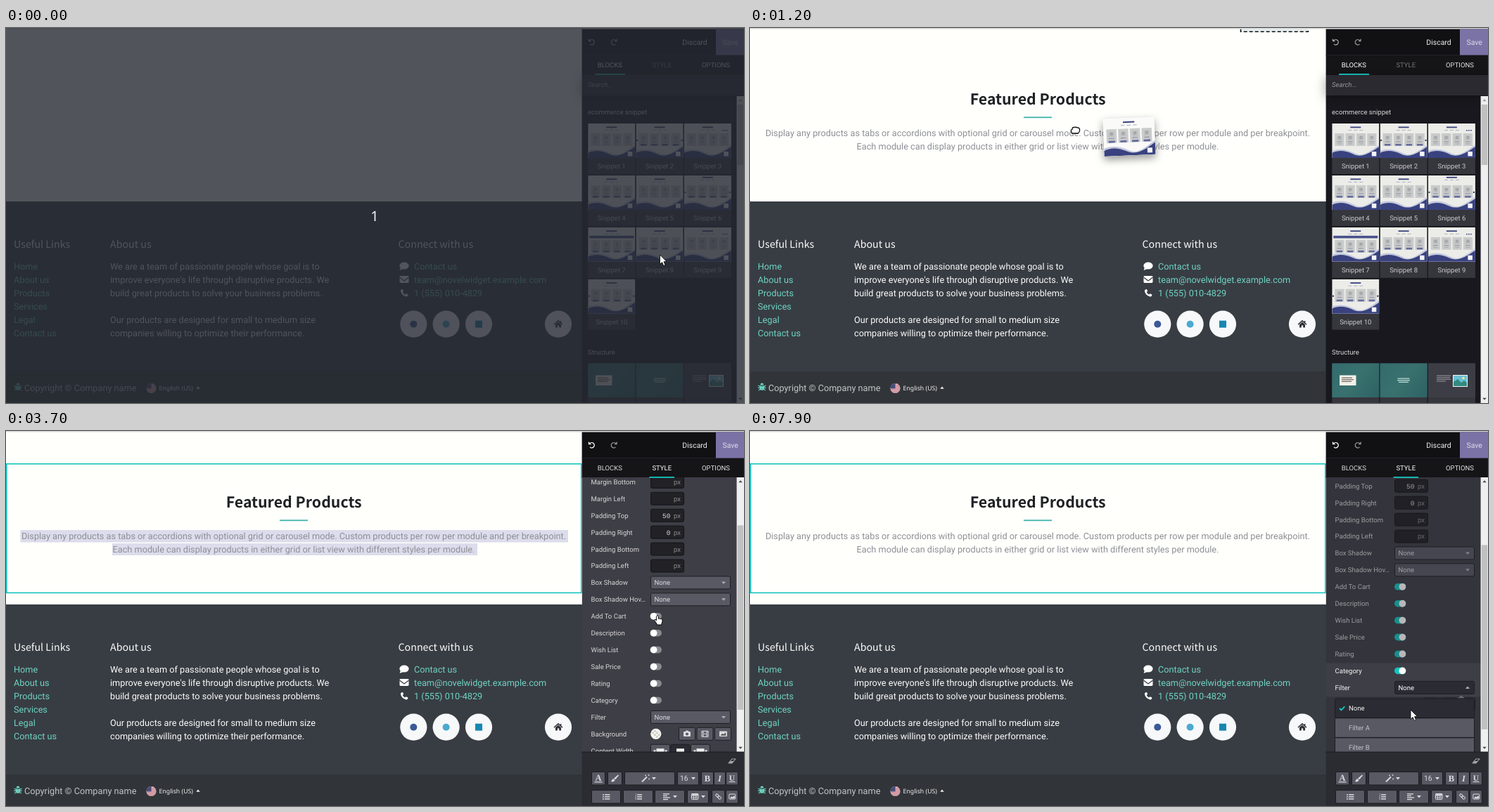
Recreate the animation shown at these times as an HTML page with a canvas. Size 1049 by 534 pixels, loop 8 s.

```html
<!DOCTYPE html>
<html lang="en">
<head>
<meta charset="utf-8">
<title>Page builder</title>
<style>
html, body { margin: 0; width: 100%; height: 100%; overflow: hidden; background: #fffffc; }
canvas { display: block; width: 1049px; height: 534px; }
</style>
</head>
<body>
<canvas id="stage" width="1049" height="534"></canvas>
<script>
const c = document.getElementById('stage').getContext('2d');
const LOOP = 8000, STEP = 100;
const UI = 'Roboto, sans-serif';
const HEAD = '"Noto Sans CJK JP", "Noto Sans CJK SC", "Noto Sans CJK", "Noto Sans", sans-serif';
const MONO = '"Liberation Mono", monospace';
const SMALL = 9.54, BODY = 12.72, SIDE = 818.6;
const TEAL = '#15c4be', LINK = '#6fd3c2', BTN = '#595964', DARK = '#1d1d22', ICON = '#dcdcdf';

// ---------- helpers ----------
function text(s, x, y, size, color, { font = UI, align = 'left', style = '' } = {}) {
  c.font = `${style} ${size}px ${font}`;
  c.textAlign = align;
  c.fillStyle = color;
  c.fillText(s, x, y + size * 0.36);
}
function box(x, y, w, h, color) {
  c.fillStyle = color;
  c.fillRect(x, y, w, h);
}
function shadowBox(x, y, w, h, color, shade, blur, drop = 0) {
  c.save();
  c.shadowColor = shade;
  c.shadowBlur = blur;
  c.shadowOffsetY = drop;
  box(x, y, w, h, color);
  c.restore();
}
function round(x, y, w, h, r, fill, line) {
  c.beginPath();
  c.roundRect(x, y, w, h, r);
  if (fill) { c.fillStyle = fill; c.fill(); }
  if (line) { c.strokeStyle = line; c.lineWidth = 1; c.stroke(); }
}
function dot(x, y, r, color) {
  c.beginPath();
  c.arc(x, y, r, 0, 7);
  c.fillStyle = color;
  c.fill();
}
function shape(d, x, y, fill, line, width = 1, scale = 1) {
  const p = new Path2D(d);
  c.save();
  c.translate(x, y);
  c.scale(scale, scale);
  c.lineWidth = width;
  c.lineJoin = 'round';
  if (fill) { c.fillStyle = fill; c.fill(p); }
  if (line) { c.strokeStyle = line; c.stroke(p); }
  c.restore();
}
const caretDown = (x, y, color, s = 1) => shape('M-3 -1.5H3L0 2Z', x, y, color, null, 1, s);
const caretUp = (x, y, color, s = 1) => shape('M-3 1.5H3L0 -2Z', x, y, color, null, 1, s);
function clip(x, y, w, h, draw) {
  c.save();
  c.beginPath();
  c.rect(x, y, w, h);
  c.clip();
  draw();
  c.restore();
}
function along(keys, t) {
  let i = 1;
  while (i < keys.length - 1 && keys[i][0] < t) i++;
  const a = keys[i - 1], b = keys[i];
  const k = Math.min(1, Math.max(0, (t - a[0]) / (b[0] - a[0])));
  return a.slice(1).map((v, j) => v + (b[j + 1] - v) * k);
}

// ---------- small icons ----------
function turnArrow(x, y, dir, color) {
  c.save();
  c.translate(x, y);
  c.scale(dir, 1);
  c.beginPath();
  c.arc(0, 0.3, 3.7, -2.4, 2.3);
  c.strokeStyle = color;
  c.lineWidth = 1.4;
  c.stroke();
  shape('M-4.6 -5V-0.8H-0.4Z', 0, 0, color);
  c.restore();
}
function trash(x, y, color) {
  shape('M-4 -3.4H4M-1.4 -3.4V-4.6H1.4V-3.4M-3 -3L-2.6 4.4H2.6L3 -3M-1 -1V3M1 -1V3', x, y, null, color, 1.1);
}
function chain(x, y, color) {
  c.save();
  c.translate(x, y);
  c.rotate(0.75);
  round(-4.6, -1.6, 5, 3.2, 1.6, null, color);
  round(-0.4, -1.6, 5, 3.2, 1.6, null, color);
  c.restore();
}
function picture(x, y, color) {
  round(x - 4.5, y - 3.5, 9, 7, 1, null, color);
  shape('M-3.5 2.6L-1 -0.4L0.6 1L2.4 -1.4L3.6 0V2.6Z', x, y, color);
}
function lines(x, y, widths, color, align = 0) {
  widths.forEach((w, i) => box(x - w * align, y + i * 2.6, w, 1.3, color));
}

// ---------- page ----------
const PHONE = 'M-4 -5L-2 -5.4L-0.8 -2.6L-2.2 -1.4C-1.4 0.3 -0.2 1.5 1.4 2.2L2.6 0.8L5.4 2L5 4C4.4 5 3.4 5.3 2.4 5C-1.6 4 -4.2 1.2 -5 -2.4C-5.2 -3.6 -4.8 -4.6 -4 -5Z';

function footer() {
  box(0, 247, 819, 242, '#383d43');
  box(0, 489, 819, 45, '#313539');
  const head = (s, x) => text(s, x, 308, 14.25, '#fbfbfb', { font: HEAD });
  head('Useful Links', 11);
  head('About us', 148);
  head('Connect with us', 557.5);
  const rows = (list, x, color) => list.forEach((s, i) => text(s, x, 339 + i * 19.1, BODY, color));
  rows(['Home', 'About us', 'Products', 'Services', 'Legal', 'Contact us'], 11, LINK);
  rows(['We are a team of passionate people whose goal is to',
    'improve everyone\'s life through disruptive products. We',
    'build great products to solve your business problems.', '',
    'Our products are designed for small to medium size',
    'companies willing to optimize their performance.'], 148, '#fbfbfb');
  rows(['Contact us', 'team@novelwidget.example.com', '1 (555) 010-4829'], 580, LINK);

  c.beginPath();
  c.ellipse(566, 338.6, 6.6, 5, 0, 0, 7);
  c.fillStyle = '#fff';
  c.fill();
  shape('M-5 2L-6.4 6.4L0 4Z', 566, 338.6, '#fff');
  round(559.5, 353, 13, 10, 1.4, '#fff');
  shape('M-6.6 -3L0 2L6.6 -3', 566, 358, null, '#383d43', 1.2);
  shape(PHONE, 566, 377.4, '#fff');

  [579.3, 625.6, 672, 785].forEach(x => dot(x, 421.7, 19.1, '#f6f8f9'));
  dot(579.3, 421.7, 5, '#3b5998');
  dot(625.6, 421.7, 5, '#4ba9cf');
  box(667, 416.7, 10, 10, '#1787b0');
  shape('M-6 0.6L0 -4.8L6 0.6M3.6 -4.6V-2', 785, 421.7, null, '#2d3034', 1.5);
  shape('M-4 0.6L0 -3L4 0.6V4.8H1.2V1.8H-1.2V4.8H-4Z', 785, 421.7, '#2d3034');

  shape('M-5.4 -2L-2 0M5.4 -2L2 0M-5.6 1.4H5.6M-4.8 5L-2 3M4.8 5L2 3M0 -1V5', 17, 511, null, LINK, 1.3);
  shape('M-2.4 -2.4C-2.4 -6.4 2.4 -6.4 2.4 -2.4ZM-3.2 -1.4H-0.5V5C-2.6 4.8 -3.2 3 -3.2 1ZM3.2 -1.4H0.5V5C2.6 4.8 3.2 3 3.2 1Z', 17, 511, LINK);
  text('Copyright © Company name', 26, 512, BODY, '#c3c5c7');

  c.save();
  c.beginPath();
  c.arc(206.5, 513, 7, 0, 7);
  c.clip();
  box(199, 506, 15, 14, '#f0eef0');
  for (let i = 0; i < 7; i++) box(199, 506 + i * 2.1, 15, 1.05, '#b5495a');
  box(199, 506, 7.5, 7.4, '#474a7a');
  c.restore();
  text('English (US)', 217.5, 513, 8.75, '#f1f1f1', { font: '"Noto Sans", "Open Sans", sans-serif' });
  caretUp(273, 512.3, '#f1f1f1', 0.9);
}

function feature(selected) {
  if (selected) {
    box(20.5, 141, 778.5, 17.5, '#dcdcec');
    box(151, 160, 519, 17, '#dcdcec');
  }
  text('Featured Products', 409.2, 101.5, 21.3, '#1f2124', { font: HEAD, align: 'center', style: 'bold' });
  box(389, 126.4, 40, 1.8, '#3fb3ab');
  const p = { align: 'center' };
  text('Display any products as tabs or accordions with optional grid or carousel mode. Custom products per row per module and per breakpoint.', 409, 149.3, BODY, '#8d8f95', p);
  text('Each module can display products in either grid or list view with different styles per module.', 409, 168.5, BODY, '#8d8f95', p);
}

function handles() {
  round(385.5, 26.5, 23, 18, 2, '#4a4a54', '#3a3a42');
  for (let i = 0; i < 6; i++) box(392 + (i % 3) * 4, 33 + (i > 2 ? 4 : 0), 2.4, 2.4, '#f2f2f2');
  round(414.5, 26.5, 18, 18, 2, '#84454e', '#6b3a42');
  trash(423.5, 35.7, '#f1e6e8');
  const arrow = (y, color) => {
    box(401, y - 8, 16, 16, color);
    shape('M0 -5V4M-4 0.4L0 4.4L4 0.4', 409, y, null, '#fff', 1.8);
  };
  arrow(71.7, '#98989b');
  arrow(205.3, '#126e68');
}

// ---------- snippet thumbnails ----------
function thumb(n, paper = '#ecede8') {
  const NAVY = '#39427f', barRow = n === 7, top = barRow ? 18 : 14;
  clip(0, 0, 67, 49, () => {
    box(0, 0, 67, 49, paper);
    box(26, n === 6 ? 2 : 4.5, 15, 1.8, NAVY);
    for (let i = 0; i < 3; i++) box(23 + i * 8, n === 6 ? 6 : 9, 5, 0.9, '#a9adb8');
    if (barRow) box(2, 12, 63, 3.6, '#47518a');
    if (n === 3 || n === 9) [54, 57, 60].forEach(x => box(x, 9, 2, 1.6, '#565f90'));
    for (let i = 0; i < 4; i++) {
      const x = 4 + i * 15.3;
      box(x, top, 13.2, 18, '#cacbcb');
      box(x + 3, top + 3, 7, 7, '#bfc0c1');
      dot(x + 6.6, top + 6, 2.2, '#a5a7aa');
      box(x + 3, top + 11.5, 7, 1, '#8b8f9e');
      if (n % 2 === 0 || barRow) box(x + 2.4, top + 15, 8.4, 2.6, '#646c9c');
      else box(x + 3.6, top + 14.4, 6, 1, '#a3a6b0');
    }
    if (n === 2 || n === 6 || n === 10) [1.6, 65].forEach(x => dot(x, top + 10, 1.2, '#3c4265'));
    shape('M0 39C12 34 24 38 34 43S56 38 67 30V49H0Z', 0, 0, '#c3c7dd');
    shape('M0 42C10 37 20 39 31 44S54 42 67 33V49H0Z', 0, 0, NAVY);
    box(56.5, 40, 6.5, 6.5, '#f4f4f8');
  });
}

function scrollbar(y0, y1, a, b) {
  box(1038.6, y0, 10.4, y1 - y0, '#efefef');
  box(1039.8, a, 8.4, b - a, '#c0c0c0');
  caretUp(1044, y0 + 6, a - y0 > 12 ? '#45454a' : '#9a9a9c', 0.9);
  caretDown(1044, y1 - 6, '#45454a', 0.9);
}

function blocks() {
  box(SIDE, 96, 1049 - SIDE, 438, '#18181e');
  shadowBox(SIDE, 67, 1049 - SIDE, 29, '#2a2a30', 'rgba(0,0,0,.35)', 16, 3);
  text('Search...', 827, 81, SMALL, '#96969b', { style: 'italic' });
  text('ecommerce snippet', 827, 120, SMALL, '#d8d8da');
  for (let i = 0; i < 10; i++) {
    const x = 827.3 + (i % 3) * 68.3, y = 136 + Math.floor(i / 3) * 73.9;
    box(x, y, 67, 72, '#36363d');
    c.save();
    c.translate(x, y);
    thumb(i + 1);
    c.restore();
    text('Snippet ' + (i + 1), x + 33.5, y + 61, SMALL, '#c9c9cc', { align: 'center' });
  }
  text('Structure', 827, 462, SMALL, '#d8d8da');
  for (let i = 0; i < 3; i++) {
    const x = 827.3 + i * 68.3;
    box(x, 477.5, 67, 57, '#36363d');
    if (i < 2) {
      const g = c.createLinearGradient(x, 477, x + 67, 526);
      g.addColorStop(0, '#336c6c');
      g.addColorStop(0.5, '#38716e');
      g.addColorStop(1, '#2e6264');
      box(x, 477.5, 67, 48.5, g);
    } else box(x, 477.5, 67, 48.5, '#3d3d46');
  }
  box(838, 494.5, 23.5, 14.5, '#f2f0ea');
  lines(841, 497.5, [15, 17, 14], '#7a6f66');
  lines(929, 498.5, [17, 18, 14], '#b9d6d3', 0.5);
  lines(976, 494.5, [20, 19, 20, 13], '#85858e');
  box(999, 494, 21, 17, '#f2f2f2');
  box(1000, 495, 19, 15, '#6cc0d4');
  shape('M0 15V9L6 5L11 10L15 7L19 10V15Z', 1000, 495, '#338a80');
  dot(1014, 498.5, 1.8, '#f5e6a5');
  scrollbar(97, 534, 109, 195);
}

// ---------- style panel ----------
const ROWS = ['Margin Top', 'Margin Right', 'Margin Bottom', 'Margin Left', 'Padding Top', 'Padding Right',
  'Padding Bottom', 'Padding Left', 'Box Shadow', 'Box Shadow Hov…', 'Add To Cart', 'Description', 'Wish List',
  'Sale Price', 'Rating', 'Category', 'Filter', 'Background', 'Content Width'];
const VALUES = { 0: '0', 4: '50', 5: '0' };
const SWITCH_AT = [3900, 4400, 5100, 5600, 6000, 6500];
const OPEN_AT = 6900;

function select(y, open) {
  round(916.5, y - 9, 113, 18, 2, open ? '#2b2b33' : BTN, DARK);
  text('None', 921.5, y, SMALL, open ? '#fff' : '#dadadd');
  (open ? caretUp : caretDown)(1020, y, '#adadb3');
}

function toggle(y, on) {
  round(916, y - 4.8, 16, 9.6, 4.8, on ? TEAL : '#88888e');
  dot(on ? 927.4 : 920.6, y, 4.9, '#fff');
}

function styleRow(i, y, t) {
  const open = t >= OPEN_AT;
  text(ROWS[i], 831.5, y, SMALL, open && (i === 15 || i === 16) ? '#f5f5f5' : '#d6d6d8');
  if (i < 8) {
    round(916.5, y - 9, 47, 18, 2, '#212126', '#131316');
    text(VALUES[i] || '', 944.5, y, SMALL, '#d9d9db', { font: MONO, align: 'right' });
    text('px', 949, y, SMALL, '#8b8b90');
  } else if (i < 10 || i === 16) select(y, i === 16 && open);
  else if (i < 16) toggle(y, t >= SWITCH_AT[i - 10]);
  else if (i === 17) {
    dot(923.8, y, 7.6, '#f4f4f4');
    for (let k = 0; k < 16; k++) {
      const a = k % 4, b = k >> 2;
      if ((a + b) % 2 && !(a % 3 === 0 && b % 3 === 0)) box(918.3 + a * 2.8, y - 5.6 + b * 2.8, 2.8, 2.8, '#d0d0c4');
    }
    [956.5, 982, 1007.5].forEach(x => round(x, y - 9, 23, 18, 2, BTN, DARK));
    round(963, y - 3.2, 10, 7, 1, ICON);
    box(966, y - 4.6, 4, 2, ICON);
    dot(968, y + 0.3, 2, BTN);
    round(989, y - 4, 9, 8, 0, null, ICON);
    shape('M-2.4 -4V4M2.4 -4V4M-2.4 0H2.4M-4 -2H-2.4M-4 2H-2.4M2.4 -2H4M2.4 2H4', 993.5, y, null, ICON, 0.9);
    round(1014, y - 3.8, 11, 7.6, 1, ICON);
    shape('M-4 2.4L-1 -0.6L0.6 0.6L4 -2V2.4Z', 1019.3, y, BTN);
  } else {
    [916.5, 945, 973.5].forEach((x, k) => {
      round(x, y - 9, 27, 18, 2, k === 1 ? '#2b2b33' : BTN, DARK);
      box(x + 8, y - 3, 11, 7, '#f0f0f0');
      if (k !== 1) [4, 20].forEach(dx => box(x + dx, y - 1, 3, 4, ICON));
    });
  }
}

function menu(y) {
  shape('M-6 0L0 -5L6 0Z', 1011, y + 16, '#6b6b74');
  ['None', 'Filter A', 'Filter B'].forEach((s, i) => {
    const top = y + 15.5 + i * 28;
    round(831.5, top, 198, 27.5, i ? 0 : 2, i ? BTN : '#2b2b33', DARK);
    text(s, 851, top + 14, SMALL, i ? '#c3c3c8' : '#f7f7f7');
    if (!i) shape('M-3.6 0L-1 2.6L3.8 -2.6', 841.5, top + 14, null, TEAL, 1.9);
  });
}

function stylePanel(t) {
  const [scroll] = along([[3000, 0], [3400, 84.5], [7200, 84.5], [7600, 126.5]], t);
  const rowY = i => 109 + i * 23.93 - scroll;
  clip(SIDE, 66, 1049 - SIDE, 391, () => {
    box(SIDE, 66, 231, 391, '#3e3e46');
    if (scroll < 30) {
      box(SIDE, 66, 231, 30 - scroll, '#36363d');
      const y = 81 - scroll, g = '#9c9ca1';
      text('Snippet 8', 831.5, y, 10.33, '#f0f0f1');
      chain(970, y, g);
      round(983.2, y - 4, 8, 8, 1, null, g);
      box(985, y - 3.6, 4, 2.4, g);
      box(985, y + 1, 4.4, 3, g);
      round(1001.5, y - 4.4, 6, 6.4, 1, null, g);
      round(1003.8, y - 2, 6, 6.4, 1, '#36363d', g);
      trash(1023.3, y, g);
    }
    ROWS.forEach((_, i) => styleRow(i, rowY(i), t));
    if (t >= OPEN_AT) {
      box(SIDE, 66, 220, rowY(15) - 11 - 66, 'rgba(32,32,38,.32)');
      box(SIDE, rowY(16) + 13, 220, 300, 'rgba(32,32,38,.32)');
      menu(rowY(16));
    }
    scrollbar(66, 457, 78 + scroll * 0.667, 340.5 + scroll * 0.667);
  });
  toolbar(t);
}

function toolbar(t) {
  box(SIDE, 457, 231, 77, '#2b2b32');
  box(SIDE, 456.6, 231, 1, '#1b1b20');
  shape('M-5 3L0 -3H5L0 3Z', 1032, 470, null, '#a5a5aa', 1.1);
  shape('M-5 3L-2.6 0H2.6L0 3Z', 1032, 470, '#a5a5aa');
  const btn = (x0, x1, y, fill = BTN) => round(x0 + 0.5, y - 9, x1 - x0 - 1, 18.5, 1.5, fill, DARK);
  const a = 494.5, b = 520.6, mid = { font: '"Liberation Serif", serif', align: 'center' };
  [[832, 852], [855, 876], [879, 951], [954, 985]].forEach(v => btn(...v, a));
  btn(988, 1006, a, t < 2300 ? '#2b2b33' : BTN);
  btn(1006, 1023, a);
  btn(1023, 1041, a);
  [[832, 874], [877, 920], [922, 965], [968, 999], [1003, 1022], [1023, 1041]].forEach(v => btn(...v, b));
  text('A', 842, a - 0.6, 12.5, ICON, { ...mid, style: 'bold' });
  box(836.5, a + 4.8, 11, 1.2, ICON);
  shape('M5 -5L-1 0.2L1 2L6 -4ZM-1.6 0.8L0.4 2.8C0 5 -3 5.4 -5 4.4C-3.4 3.8 -4 1 -1.6 0.8Z', 865, a, ICON);
  shape('M-5 5L2 -2M4 -4L5 -5', 909, a, null, ICON, 1.8);
  shape('M-1 -4H1M0 -5V-3M4 1H6M5 0V2', 909, a, null, ICON, 0.8);
  caretDown(921, a, ICON);
  text('16', 958, a, 10.33, ICON);
  caretDown(977, a, ICON);
  text('B', 997, a, 12.5, ICON, { ...mid, style: 'bold' });
  text('I', 1014.5, a, 12.5, ICON, { ...mid, style: 'italic bold' });
  text('U', 1032, a - 0.6, 11.5, ICON, { ...mid, style: 'bold' });
  box(1027.5, a + 4.6, 9, 1, ICON);
  for (let i = 0; i < 3; i++) {
    const y = b - 3.4 + i * 3;
    box(848, y, 1.8, 1.6, ICON);
    box(851, y, 7.4, 1.5, ICON);
    text(i + 1, 894, y + 0.7, 4, ICON);
    box(897, y, 7, 1.5, ICON);
  }
  lines(934, b - 4.4, [9, 6, 10, 7], ICON);
  caretDown(951, b, ICON);
  round(974.5, b - 4, 9.5, 8, 1, null, ICON);
  shape('M-4.7 -1.3H4.7M-4.7 1.4H4.7M-1.6 -4V4M1.6 -4V4', 979.2, b, null, ICON, 0.9);
  box(974.5, b - 4, 9.5, 2, ICON);
  caretDown(991, b, ICON);
  chain(1012.5, b, ICON);
  picture(1032.3, b, ICON);
}

function sidebar(t, styling) {
  box(SIDE, 1.5, 231, 37, '#111114');
  box(SIDE, 38, 231, 29, '#151518');
  box(SIDE, 38, 231, 0.8, '#29292e');
  turnArrow(832.5, 20, 1, styling ? '#fff' : '#a5a5a8');
  turnArrow(864, 20, -1, '#949498');
  text('Discard', 979, 20, 10.5, '#efefef', { align: 'center' });
  box(1009, 1.5, 40, 37, '#7b73a6');
  text('Save', 1029.7, 20, 10.5, '#dcd9ea', { align: 'center' });
  styling ? stylePanel(t) : blocks();
  const tab = (s, x, color) => text(s, x, 52.3, SMALL, color, { align: 'center' });
  tab('BLOCKS', 858.3, styling ? '#d9d9d9' : '#fff');
  tab('STYLE', 932.3, styling ? '#fff' : '#77777b');
  tab('OPTIONS', 1009, '#e2e2e2');
  if (styling) box(914.5, 65, 35.5, 1.8, TEAL);
  else box(837, 65, 43, 1.8, TEAL);
}

// ---------- pointer ----------
const PATH = [[0, 929.5, 323], [500, 929.5, 323], [600, 905, 318], [700, 765, 278], [800, 618, 234.5], [900, 540, 195],
  [1100, 470, 150], [1300, 455, 140], [1700, 470, 150], [2000, 460, 144], [2200, 462, 150], [2600, 462, 150],
  [2700, 558, 172], [3000, 925, 285], [3500, 932, 272], [3700, 926, 263], [3900, 926, 263], [4300, 926, 287],
  [4500, 926, 287], [4800, 926, 310], [5100, 926, 310], [5300, 927, 338], [5600, 927, 338], [5900, 927, 361],
  [6100, 927, 361], [6400, 927, 386], [6600, 931, 389], [6700, 942, 402], [7200, 942, 402], [7500, 940, 446], [7900, 939, 397]];

const KINDS = [[5600, 'arrow'], [3600, 'hand'], [2800, 'arrow'], [2700, 'resize'], [1300, 'beam'], [600, 'grab'], [0, 'arrow']];
const DRAW = {
  arrow: (x, y) => shape('M0 0V13.4L3.1 10.6L5.2 15.4L7.6 14.4L5.5 9.7H9.6Z', x, y, '#fff', '#000', 0.8),
  hand: (x, y) => shape('M0 0C-1.6 0 -1.6 1 -1.6 1.6V7L-3 5.6C-4.2 5.2 -4.8 6.4 -4 7.2L-1 11.6V13H6V11C7.2 9 7 6 6.8 5.4C6.4 4.4 5 4.6 4.8 5C4.4 4 3 4 2.8 4.6C2.4 4 1.6 4 1.4 4.4V1.4C1.4 0.4 0.8 0 0 0Z', x, y, '#fff', '#000', 1),
  beam: (x, y) => {
    const d = 'M-3 -6H-1L0 -5L1 -6H3M0 -5V5M-3 6H-1L0 5L1 6H3M-1.6 2H1.6';
    shape(d, x, y, null, '#fff', 3.2);
    shape(d, x, y, null, '#111', 1.5);
  },
  resize: (x, y) => shape('M0 -8L5.6 -2.6H1.8V2.6H5.6L0 8L-5.6 2.6H-1.8V-2.6H-5.6Z', x, y, '#fff', '#111', 1.3),
  grab: (x, y) => shape('M-5 5H4L6 2V-1.4C6 -3 4 -3 3.8 -2.4C3.4 -4 1.4 -4 1 -3C0.4 -4.4 -1.6 -4.4 -2 -3C-3 -4 -4.4 -3.4 -4.4 -2V-0.4C-6.4 -0.6 -6.4 1 -6 2Z', x, y, '#fff', '#111', 1.3)
};

function dragged(x, y) {
  const paper = '#fafaf9';
  c.save();
  c.translate(x + 76.5, y + 9.7);
  c.rotate(-0.042);
  c.scale(1.09, 1.09);
  c.translate(-33.5, -24.5);
  shadowBox(0, 0, 67, 49, paper, 'rgba(0,0,0,.4)', 12, 5);
  thumb(8, paper);
  c.restore();
}

function dropZone() {
  box(697, 1.5, 97, 4, '#e6eeee');
  c.setLineDash([5, 3]);
  shape('M697.5 1.5V5.3H793.5V1.5', 0, 0, null, '#111', 1.6);
  c.setLineDash([]);
}

// ---------- scene ----------
function scene(t) {
  const styling = t >= 2100, selected = t >= 2200 && t < 3900;
  box(0, 0, 1049, 534, '#fffffc');
  footer();
  if (t >= 700) feature(selected);
  if (styling) {
    c.strokeStyle = TEAL;
    c.lineWidth = 1.6;
    c.strokeRect(0.8, 46.8, 817, 183.6);
    if (t < 2900) handles();
  }
  const blink = (t >= 4400 && t < 4800) || (t >= 6200 && t < 6500);
  if (t >= 3900 && t < OPEN_AT && !blink) box(311.4, 86, 1.1, 29, '#222');
  if (t >= 600 && t < 1300) dropZone();
  box(0, 0, 1049, 1.5, '#d6d6d8');
  sidebar(t, styling);

  const [x, y] = along(PATH, t);
  if (t >= 600 && t < 1300) dragged(x, y);
  if (t < 500) {
    box(0, 0, 1049, 534, 'rgba(38,42,51,.8)');
    text('1', 524, 267.3, 20, '#f2f2f2', { font: '"Noto Sans", sans-serif', align: 'center' });
  }
  DRAW[KINDS.find(k => t >= k[0])[1]](x, y);
}

c.textRendering = 'geometricPrecision';
const start = performance.now();
function tick() {
  const t = (performance.now() - start) % LOOP;
  scene(Math.floor(t / STEP) * STEP);
  requestAnimationFrame(tick);
}
tick();
</script>
</body>
</html>
```
